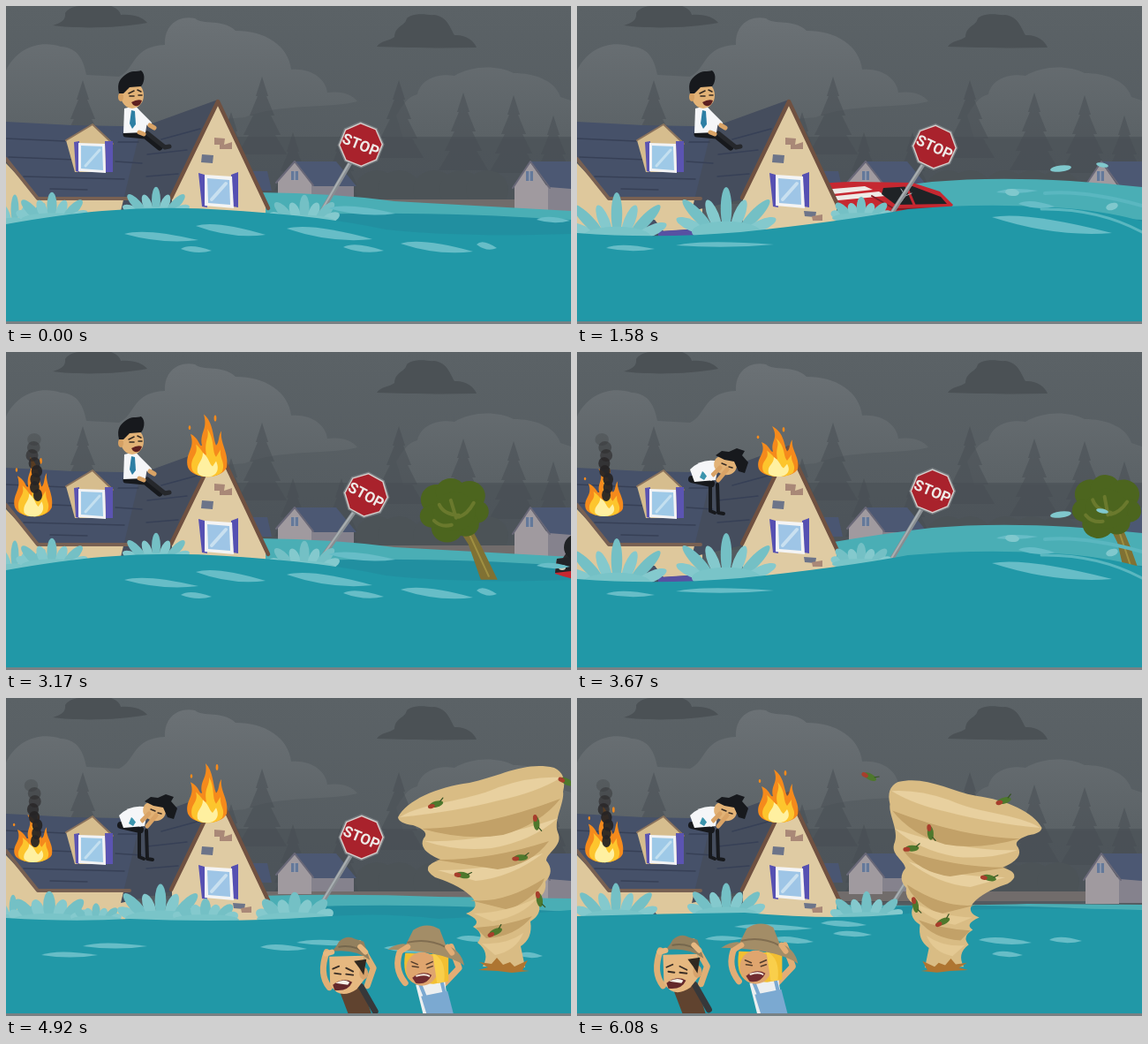
Animation of 640x360 px, one loop 6160 ms. Source, as an HTML page with a canvas:

```html
<!DOCTYPE html>
<html lang="en">
<head>
<meta charset="utf-8">
<title>Flooded village</title>
<style>
html, body { margin: 0; height: 100%; overflow: hidden; background: #5c6367; }
canvas { display: block; width: 640px; height: 360px; }
</style>
</head>
<body>
<canvas id="stage" width="640" height="360"></canvas>
<script>
const ctx = document.getElementById('stage').getContext('2d');
const LOOP = 6160, STEP = 1000 / 12;

function fill(color, path) {
  ctx.fillStyle = color;
  ctx.fill(new Path2D(path));
}
function line(color, width, path) {
  ctx.strokeStyle = color;
  ctx.lineWidth = width;
  ctx.lineCap = ctx.lineJoin = 'round';
  ctx.stroke(new Path2D(path));
}
function oval(color, x, y, rx, ry, angle = 0) {
  ctx.fillStyle = color;
  ctx.beginPath();
  ctx.ellipse(x, y, rx, ry, angle, 0, Math.PI * 2);
  ctx.fill();
}
function at(x, y, draw, angle = 0, sx = 1, sy = sx) {
  ctx.save();
  ctx.translate(x, y);
  ctx.rotate(angle);
  ctx.scale(sx, sy);
  draw();
  ctx.restore();
}

function drawSky() {
  const sky = ctx.createLinearGradient(0, 0, 0, 225);
  sky.addColorStop(0, '#5b6266');
  sky.addColorStop(1, '#545b60');
  ctx.fillStyle = sky;
  ctx.fillRect(0, 0, 640, 360);
  const cloud = ctx.createLinearGradient(0, 15, 0, 150);
  cloud.addColorStop(0, '#6b7175');
  cloud.addColorStop(1, '#5b6266');
  fill(cloud, 'M0 73C12 48 38 38 62 46C82 47 88 62 91 78L128 80C148 70 142 46 180 44C179 22 195 10 214 14C222 22 246 14 260 28C294 28 320 45 323 72C345 70 362 82 364 98C380 96 392 100 398 108C370 116 310 110 270 126L0 150Z');
  fill(cloud, 'M442 124C450 112 454 103 466 100C470 82 490 76 508 79C526 68 555 66 575 76C598 76 622 84 628 103L640 107V150H450Z');
  fill('#4b5155', 'M53 22C62 19 68 16 67 8C74-2 84 2 92-3C108-5 128 0 130 10C145 9 155 13 160 19C130 25 80 26 53 22Z');
  fill('#4b5155', 'M420 46C424 39 436 39 440 35C441 22 452 23 454 14C464 6 479 11 485 10C500 12 503 25 508 33C520 32 530 39 533 47C490 48 450 47 420 46Z');
  ctx.fillStyle = 'rgba(72,79,84,.55)';
  ctx.fillRect(0, 148, 640, 76);
  for (const [x, top] of [[87, 84], [290, 80], [325, 143], [445, 84], [518, 98], [575, 101], [620, 124], [380, 143], [255, 120]]) {
    let tree = `M${x} ${top}`;
    for (let k = 1; k <= 4; k++) tree += `L${x + k * 7} ${top + k * 22}L${x + k * 5} ${top + k * 22}`;
    for (let k = 4; k >= 1; k--) tree += `L${x - k * 5} ${top + k * 22}L${x - k * 7} ${top + k * 22}`;
    fill('rgba(70,77,82,.5)', tree + 'Z');
  }
  for (const x of [420, 445, 485, 515, 545]) oval('#4c5357', x, 208, 24, 22);
}

function drawFarHouses() {
  fill('#716c6b', 'M290 219H640V230H290Z');
  fill('#4a5672', 'M278 187H296L301 209H278Z');
  fill('#85828d', 'M343 202H394V219H343Z');
  fill('#4c5873', 'M327 176H374L397 204H348Z');
  fill('#a09a9f', 'M308 222V197L327 177L346 201V222Z');
  line('#696878', 2, 'M306 200L327 176L348 203');
  fill('#64799a', 'M323 187H331V197H323Z');
  fill('#85828d', 'M611 203H640V232H611Z');
  fill('#4c5873', 'M594 176H640V207L615 205Z');
  fill('#a09a9f', 'M576 233V203L594 177L614 206V233Z');
  line('#696878', 2, 'M574 206L594 176L616 206');
  fill('#64799a', 'M589 187H597V198H589Z');
  line('#b0b0b8', 1, 'M327 187V197M593 187V198');
}

function drawHouse() {
  fill('#dec89c', 'M0 178L36 216H142V268H0Z');
  fill('#465064', 'M73 242H88L98 255L142 252V268H90Z');
  fill('#5751a2', 'M92 255L140 252V262H92Z');
  fill('#465169', 'M0 131L75 135L186 137L140 218H36L0 170Z');
  fill('#454d5d', 'M150 149L160 135L240 106L187 219L130 232Z');
  line('#374056', 1.5, 'M0 150L67 153M122 154H150M3 171L78 174M124 176L154 178M20 193L134 196M176 151L220 139M160 168L205 163M159 193L195 190M50 207L92 208');
  line('#786052', 4, 'M0 173L36 218H140');
  fill('#465169', 'M98 134L132 145L122 162Z');
  fill('#d6bd8e', 'M68 152L98 134L121 155V188H78Z');
  line('#8a725c', 2, 'M68 152L98 134L121 156');
  fill('#5b54b2', 'M77 154L83 153V188L79 187ZM112 153H121V188H113Z');
  fill('#f2f3f5', 'M82 155L112 156L113 189L82 187Z');
  fill('#9ec9e7', 'M85 158L109 159L110 186L85 184Z');
  line('#c4e0f0', 3, 'M90 181L106 163');

  fill('#dfcba3', 'M240 109L294 225V268H188V216Z');
  line('#705141', 4.5, 'M187 217L240 108L297 229');
  fill('#6c7489', 'M222 168L235 169L234 178L221 177Z');
  fill('#a98877', 'M236 149L248 150L247 157L256 154V162H242V157H236Z');
  fill('#6c7489', 'M257 232L271 233L270 239L258 238Z');
  fill('#a98877', 'M266 238L278 236V243H267Z');
  fill('#5650b2', 'M218 189L225 191L228 228L222 227ZM255 191L263 188V228L257 227Z');
  fill('#f4f4f4', 'M225 191L256 193L258 229L225 226Z');
  fill('#9ec5e6', 'M228 195L253 197L254 225L229 223Z');
  line('#c9e0f0', 4, 'M233 219L249 201');
}

function drawSittingMan() {
  line('#17191d', 7, 'M136 145L158 147L174 160');
  line('#26282c', 5, 'M160 144L180 160L185 159');
  fill('#f5f6f8', 'M134 116L147 113L160 131L158 143L133 144Z');
  line('#f5f6f8', 6, 'M148 119L162 133');
  line('#d9a366', 5, 'M163 135L168 138M151 143L156 145');
  fill('#2d7fa4', 'M142 118L146 119L147 134L143 139L140 133Z');
  oval('#e2b276', 143, 101, 13, 15);
  oval('#d5a063', 130, 103, 3, 5);
  fill('#17191d', 'M128 99C125 86 130 82 135 78C142 72 148 75 153 73C159 78 156 88 153 91L140 92L133 99Z');
  line('#362b23', 1.6, 'M139 99L145 96M149 95L153 97M140 102H145M150 101H154');
  fill('#5d2020', 'M142 109Q149 105 154 107Q151 116 144 112Z');
}

function drawGrievingMan() {
  line('#17191d', 8, 'M130 144L152 149');
  line('#17191d', 4, 'M151 149V180L156 182M159 150L160 182L166 183');
  fill('#f5f6f8', 'M128 133Q142 119 161 124L157 145L133 147Z');
  fill('#3b94ad', 'M142 135L148 139L144 145L139 142Z');
  oval('#e2b276', 168, 128, 13, 11, .3);
  fill('#17191d', 'M157 117L164 112L172 113L181 109L190 112L187 117L194 125L190 137L183 135L178 124L167 122Z');
  line('#362b23', 1.5, 'M164 126L169 128M172 130L176 131');
  line('#d9a366', 5, 'M154 139L162 131M160 145L170 133');
  line('#f5f6f8', 5, 'M142 130L152 143');
}

function drawFire(i, seed) {
  const beat = Math.floor((i + seed) / 2) % 4;
  const lean = [0, 3, -2, 1][beat], tall = [1, 1.12, .95, 1.18][beat];
  ctx.save();
  ctx.scale(1, tall);
  fill('#f58a1c', `M-21-8C-25-22-12-25-18-40C-8-36-8-27-5-29C-8-42 2-44 ${-4 + lean}-59C8-51 7-38 11-29C15-32 13-38 17-43C15-31 26-22 23-8C17 4-15 4-21-8Z`);
  fill('#fdc52d', `M-16-5C-20-18-8-19-12-30C-4-24-3-19 0-20C-3-34 4-36 ${lean}-45C10-34 6-24 11-18L16-25C15-15 22-13 18-4C11 3-10 3-16-5Z`);
  fill('#fff0a0', `M-10-3C-12-12-4-13-4-22C4-16 3-11 7-9L11-14C17-3 7 2 0 1Q-7 1-10-3Z`);
  oval('#f58a1c', 9 + lean, -55, 1.4, 3);
  oval('#f58a1c', -20 + lean, -46, 1.3, 2);
  ctx.restore();
}
function drawSmoke(i) {
  for (let k = 0; k < 8; k++) {
    const sway = Math.sin(k * 1.7 + i * .4);
    oval(`rgba(38,36,37,${.95 - Math.max(0, k - 3) * .19})`, 35 - k * .7 + sway * 2, 162 - k * 9, 5 + k * .4, 7);
  }
}

function drawSign(i) {
  const x = 405 - 3 * Math.cos(i * Math.PI * 2 / 15.2);
  const y = x * .8 - 164.5;
  line('#888d91', 5, `M${x} ${y}L355 237`);
  line('#a9afb2', 2, `M${x - 1} ${y}L354 237`);
  at(x, y, () => {
    const octagon = r => Array.from({ length: 8 }, (_, k) => {
      const a = (k + .5) * Math.PI / 4;
      return `${k ? 'L' : 'M'}${r * Math.cos(a)} ${r * Math.sin(a)}`;
    }).join('') + 'Z';
    fill('#787f83', octagon(26.5));
    fill('#d8d1ce', octagon(25));
    fill('#a9222c', octagon(23.5));
    ctx.fillStyle = '#eee9e6';
    ctx.font = 'bold 17px Roboto, sans-serif';
    ctx.textAlign = 'center';
    ctx.textBaseline = 'middle';
    ctx.fillText('STOP', 0, 1);
  }, .38 + (x - 402) * .02);
}

function drawCar(i) {
  if (i < 12 || i > 42) return;
  const x = 481 + 20 * (i - 31);
  const roll = Math.min(1, Math.max(0, (i - 32) / 4));
  at(x, 202 + 56 * roll, () => {
    fill('#292a2d', 'M8 22H178V44L155 50L20 40Z');
    oval('#202225', 26, 37, 15, 15);
    oval('#87847a', 26, 37, 7, 7);
    oval('#202225', 147, 38, 16, 15);
    fill('#c62831', 'M1 7Q28-3 73-3L139-2L170 8L185 23L175 37L118 31L3 24Z');
    fill('#222528', 'M1 8L19 10L22 26L3 24Z');
    oval('#cccdb9', 9, 14, 4, 3);
    fill('#eeeae6', 'M25 7L85 2L94 6L39 12ZM43 14L101 8L109 13L55 18Z');
    fill('#1f2326', 'M106 4L139 2L171 14L178 22L120 23L104 11Z');
    line('#c62831', 3, 'M132 2L141 23');
    line('#adb8ba', 1, 'M126 5L131 13L126 20M131 13L138 10');
    line('#801e27', 2, 'M93 13L119 28L172 27');
  }, 0, 1, Math.cos(roll * Math.PI));
}

function drawTree(i) {
  if (i < 19 || i > 46) return;
  const x = 400 + 15.4 * (i - 31), y = 185 - (i - 31) * .6;
  at(x, y, () => {
    fill('#807133', 'M1 9L15 14L20 20L31 40L49 77H30L16 37L7 23Z');
    line('#a09042', 2, 'M16 23L39 73');
    for (const [a, b, r] of [[-20, -14, 18], [-4, -22, 17], [17, -18, 18], [25, 0, 14], [13, 14, 15], [-8, 18, 18], [-25, 5, 14], [0, 0, 24]]) oval('#4c651e', a, b, r, r * .93);
    line('#6a792d', 4, 'M-17-8Q-12 3 5 4M-4-13L2 7M22-10Q15 3 5 6M-23 10Q-15 18-3 15');
  }, (i - 38) * .018);
}

// Five held swells: surface, distant water, streaks [x, y, length, slope] and foam [x, y, half width, height].
const SWELLS = [
  {
    front: 'M0 247Q62 236 109 232Q180 226 250 231Q355 237 430 253Q510 262 640 258',
    back: 'M285 211Q375 212 440 221L640 232',
    streaks: [[134, 258, 84, 7], [215, 249, 79, 10], [198, 275, 35, 2], [318, 252, 97, 12], [382, 273, 46, 4], [447, 269, 82, 9], [533, 270, 23, 4], [365, 229, 76, 6], [601, 242, 38, 1]],
    foam: [[10, 250, 28, 35], [52, 244, 35, 32], [170, 237, 31, 31], [338, 246, 35, 31]]
  },
  {
    front: 'M0 253Q125 248 205 239Q300 225 405 231Q510 235 640 248',
    back: 'M285 215Q370 202 460 207L640 219',
    streaks: [[75, 270, 90, 2], [190, 260, 99, 0], [360, 249, 100, 8], [480, 255, 97, 10], [555, 244, 65, 7]],
    foam: [[44, 258, 36, 36], [174, 249, 34, 36], [325, 239, 32, 25]]
  },
  {
    front: 'M0 257Q90 264 185 256Q300 244 375 230Q465 222 555 229Q610 234 640 244',
    back: 'M285 216Q350 205 402 199Q505 190 640 205',
    streaks: [[33, 274, 55, 1], [112, 271, 111, -1], [470, 239, 136, 18], [475, 211, 47, -2], [500, 224, 41, 3]],
    foam: [[45, 264, 39, 51], [169, 258, 39, 51], [322, 242, 33, 25]],
    spray: true
  },
  {
    front: 'M0 249Q75 254 140 250Q250 255 350 248Q425 242 490 250Q560 247 640 240',
    back: 'M285 224Q390 221 490 225L640 227',
    streaks: [[87, 281, 73, 0], [40, 291, 64, 0], [329, 277, 74, 1], [288, 282, 53, 2], [428, 283, 56, 4], [510, 272, 42, 2], [580, 291, 28, 1]],
    foam: [[8, 254, 27, 30], [49, 254, 43, 34], [102, 253, 29, 20], [175, 252, 40, 40], [226, 253, 38, 25], [327, 252, 43, 31]]
  },
  {
    front: 'M0 247Q100 244 190 243Q290 252 365 245Q470 235 640 240',
    back: 'M285 234Q420 236 510 233L640 234',
    streaks: [[178, 259, 89, 2], [145, 273, 45, -1], [220, 273, 48, 3], [276, 255, 52, 2], [290, 267, 44, 1], [455, 274, 60, 3], [535, 274, 37, 1], [470, 290, 35, 1]],
    foam: [[44, 251, 36, 40], [169, 247, 36, 36], [328, 252, 36, 32]]
  }
];

function drawFoam([x, y, width, height]) {
  for (let k = -3; k <= 3; k++) {
    const a = k * .38, size = height * (k % 2 ? .78 : 1);
    at(x + k * width * .16, y, () => oval(k % 2 ? '#84c9cd' : '#74c0c5', 0, -size * .56, width * .16, size * .48), a);
  }
  oval('#79c4c8', x, y - 2, width, height * .24);
}
function drawBackWater(swell) {
  fill('#4aaeb5', swell.back + 'V300H285Z');
  fill('#218fa0', 'M300 239Q430 229 640 242V300H300Z');
}
function drawFrontWater(swell) {
  swell.foam.forEach(drawFoam);
  fill('#2198a7', swell.front + 'V360H0Z');
  for (const [x, y, length, slope] of swell.streaks) {
    fill('#67bdc7', `M${x} ${y}Q${x + length * .28} ${y - 7} ${x + length} ${y + slope}Q${x + length * .52} ${y + slope + 5} ${x} ${y}Z`);
  }
  if (swell.spray) {
    line('#5ab7c0', 4, 'M530 212Q575 208 640 226');
    line('#5ab7c0', 3, 'M526 230Q590 229 640 256');
    oval('#80c8cd', 548, 184, 12, 3.5, -.12);
    oval('#80c8cd', 606, 227, 7, 4, -.3);
    oval('#80c8cd', 493, 211, 8, 4, .1);
    oval('#80c8cd', 595, 180, 7, 2.5, .2);
  }
}

function drawTornado(i) {
  if (i < 46) return;
  const x = 565 - 10.7 * (i - 59);
  const turned = Math.floor(i / 3) % 2 === 0;
  at(x, 308, () => {
    fill('#d9bc84', 'M-121-173C-111-192-78-207-40-212C-6-219 23-237 56-229Q71-222 66-202C68-190 55-170 60-156C67-141 48-134 47-124Q57-112 46-100Q48-87 36-80Q45-65 29-55Q32-36 18-27L23-3L-25-4Q-16-20-31-31Q-22-41-36-49Q-25-56-44-64Q-28-70-36-81Q-48-95-79-105Q-98-117-73-125Q-99-136-92-149Q-84-157-104-164Q-120-166-121-173Z');
    fill('#e8d09f', 'M-119-173C-93-190-45-190-7-207Q31-220 64-218Q36-201-7-192Q-52-180-119-173ZM-91-146Q-21-144 60-172Q31-146-15-138Q-55-134-91-146ZM-76-113Q-11-113 43-132Q8-105-33-101Z');
    fill('#c2a168', 'M-94-160Q-25-161 63-194Q40-165-2-153Q-44-146-94-160ZM-79-125Q-18-124 50-146Q30-119-8-114ZM-39-79Q0-75 45-104Q39-85 5-68ZM-33-48Q2-50 31-61Q13-38-21-36Z');
    fill('#e4c993', 'M-35-64Q2-65 37-82Q20-61-14-55ZM-26-30Q1-28 21-42Q13-22-11-17Z');
    fill('#ae7531', 'M-29-9L-15-7L-9-14L-2-6L6-9L11-4L26-11L20 0L28 1L8 3L-8 1L-30 0L-19-3Z');
  }, 0, turned ? -.92 : 1, turned ? .93 : 1);
  for (let k = 0; k < 7; k++) {
    const reach = 88 - k * 9, turn = i * .65 + k * 2.3;
    at(x + Math.cos(turn) * reach, 91 + k * 28 + Math.sin(turn) * 6, () => {
      oval('#4e782d', 0, 0, 8, 3.5);
      oval('#a73e2c', -6, 1, 4, 2.5);
      line('#355323', 1.2, 'M5-2L9-5');
    }, .5 + Math.sin(k * 4));
  }
}

function drawRunningMan() {
  line('#dfaf75', 7, 'M-24 57Q-36 42-27 17M19 55L26 35L10 7');
  fill('#60432f', 'M-12 62L13 53L25 91H-1Z');
  line('#37383a', 7, 'M12 56L28 84');
  fill('#e6b880', 'M-24 22L15 21L18 45L7 59Q-12 72-23 54Z');
  oval('#d7a36c', 15, 41, 5, 7);
  fill('#302820', 'M4 27L18 25L15 43L10 35Z');
  line('#392d25', 1.8, 'M-20 36L-13 33M-5 35L3 39M-18 41L-11 42M-5 42L3 43');
  fill('#64282a', 'M-20 54Q-8 45 2 51Q-3 62-18 60Z');
  fill('#f5f1e8', 'M-17 52Q-8 47-1 51L-3 54Z');
  fill('#92805e', 'M-24 17Q-18 15-13 5Q-4-3 5 2L15 5L22 26Q3 12-24 17Z');
  line('#75674d', 2, 'M-13 11Q4 8 18 19');
  line('#e6b880', 6, 'M-28 19L-21 17M11 11L17 17');
}
function drawRunningWoman() {
  line('#e3ad75', 7, 'M-24 66Q-38 49-29 28M20 67L37 49L28 25');
  fill('#eceff0', 'M-12 68L21 64L27 108H-2Z');
  fill('#7ba9d1', 'M-6 81L24 75L33 110H3Z');
  line('#7ba9d1', 4, 'M-8 65L0 85M17 63L21 80');
  fill('#f2bf32', 'M-24 32Q-28 57-16 65L8 67L25 64V34Z');
  oval('#dfa56e', -5, 50, 18, 19);
  fill('#f9cf4b', 'M7 32Q23 39 20 65L12 66Z');
  line('#533d2c', 1.5, 'M-17 42L-10 45M0 45L7 42M-16 47L-9 48M1 49L7 47');
  fill('#712c30', 'M-16 60Q-4 51 6 57Q0 69-12 66Z');
  line('#f7eee2', 2, 'M-11 58Q-2 55 3 58');
  fill('#a38d67', 'M-44 28Q-31 20-23 22L-15 6Q0-4 15 5L22 23Q39 28 43 46Q18 29-44 28Z');
  line('#806d50', 2, 'M-21 20Q2 15 21 25');
  line('#e3ad75', 6, 'M-29 30L-21 25M24 25L29 32');
}

function drawRunners(i) {
  if (i < 45) return;
  const x = 563 - 19.2 * (i - 50);
  const bob = 270 + 3 * Math.sin((i - 54) * 1.3);
  at(x + 86, bob - 14, drawRunningWoman);
  at(x, bob, drawRunningMan);
}

function drawScene(i) {
  const swell = SWELLS[Math.floor(i * .4) % SWELLS.length];
  drawSky();
  drawFarHouses();
  drawBackWater(swell);
  drawCar(i);
  drawTree(i);
  drawHouse();
  if (i < 44) drawSittingMan(); else drawGrievingMan();
  if (i >= 24) {
    at(30, 185, () => drawFire(i, 1), 0, .95);
    drawSmoke(i);
  }
  if (i >= 32) at(227, 140, () => drawFire(i, 0));
  drawSign(i);
  drawFrontWater(swell);
  drawTornado(i);
  drawRunners(i);
  ctx.fillStyle = '#788184';
  ctx.fillRect(0, 357, 640, 3);
}

function play() {
  // Motion is held on twelve poses per second.
  drawScene(Math.floor((performance.now() % LOOP + 4) / STEP));
  requestAnimationFrame(play);
}
play();
</script>
</body>
</html>
```
